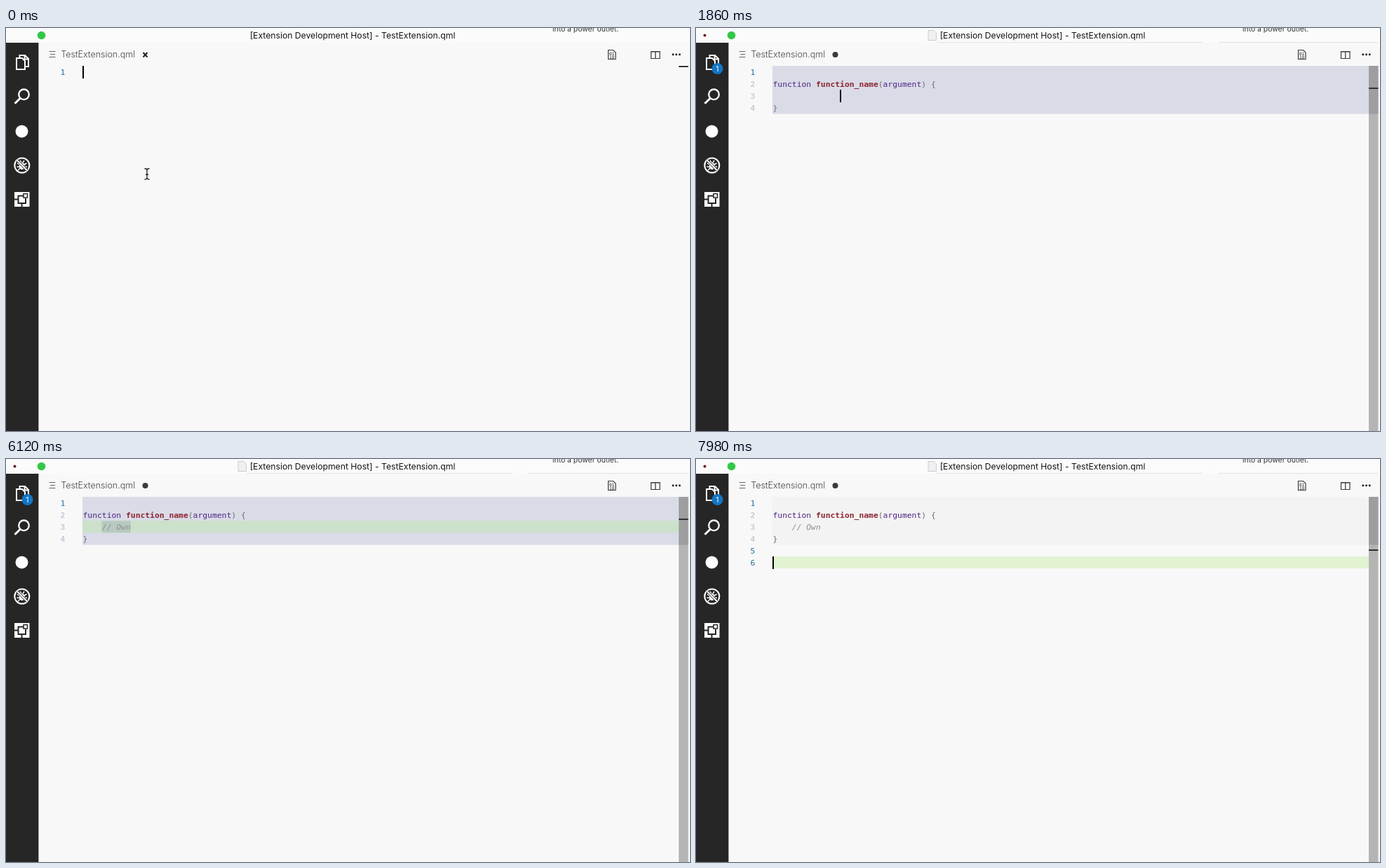
These frames come from a looping animation (975x575 px, 8000 ms). An HTML page:

```html
<!DOCTYPE html>
<html lang="en">
<head>
<meta charset="utf-8">
<title>Snippet demo</title>
<style>
  html, body { margin: 0; width: 100%; height: 100%; overflow: hidden; background: #f8f8f8; }
  svg { display: block; width: 975px; height: 575px; }
  text { white-space: pre; }
  .ui { font-family: Inter, "Open Sans", sans-serif; }
  .code { font: 11.35px "DejaVu Sans Mono", "Noto Sans Mono", monospace; }
  .key { fill: #4f2385; }
  .name { fill: #8c2530; font-weight: bold; }
  .punct { fill: #6c6c70; }
  .note { fill: #8e8e92; font-style: italic; }
  .num { fill: #237399; text-anchor: middle; }
  .pale { fill: #c9c9d8; font-weight: bold; }
  .line { fill: none; stroke: #fff; stroke-width: 2; }
  .dark { fill: none; stroke: #3a3a3a; stroke-width: 1.2; }
  .brace { fill: #b9c0bd; stroke: #8a918c; }
</style>
</head>
<body>
<svg viewBox="0 0 975 575">
  <rect width="975" height="575" fill="#f8f8f8"/>
  <rect width="975" height="21" fill="#fbfbfb"/>

  <!-- title bar -->
  <g data-on="60">
    <circle cx="12.5" cy="10.5" r="2" fill="#6d1512"/>
    <path d="M343 20.5H722M745 20.5H972" stroke="#e3e3e3"/>
    <path d="M331 3.5h8l3.5 3.5v10.5h-11.5z" fill="#eef0f2" stroke="#c9ccd0"/>
  </g>
  <circle cx="50.5" cy="10.5" r="5.8" fill="#33c748"/>
  <text class="ui" x="494" y="15" font-size="12.2" text-anchor="middle" fill="#151515">[Extension Development Host] - TestExtension.qml</text>
  <text class="ui" x="779" y="5" font-size="10.4" fill="#333">into a power outlet.</text>

  <!-- activity bar -->
  <rect y="21" width="46.4" height="554" fill="#262626"/>
  <path class="line" d="M19.500 43v-4h7.500l5 5v11h-4.500M26.500 39v5.500h5.500"/>
  <path class="line" d="M15 43h8l4 4v12h-12z" fill="#262626"/>
  <circle cx="25.5" cy="94.800" r="7.300" fill="none" stroke="#fff" stroke-width="2.300"/>
  <path d="M20.200 100.200L12.500 107.800" stroke="#fff" stroke-width="3"/>
  <circle cx="22.5" cy="147.5" r="9" fill="#fff"/>
  <g>
    <circle class="line" cx="22.800" cy="196" r="10.500"/>
    <ellipse cx="22.800" cy="197" rx="4" ry="5" fill="#fff"/>
    <path d="M16 193l4 2M15.500 198h4M17 203l3-3M29.500 193l-4 2M30 198h-4M28.500 203l-3-3M20 189l2 3M26 189l-2 3" stroke="#fff" stroke-width="1.400"/>
    <path d="M15.500 188.500L30.500 203.500" stroke="#262626" stroke-width="3.500"/>
    <path d="M15.500 188.500L30.500 203.500" stroke="#fff" stroke-width="2"/>
  </g>
  <rect x="12" y="234" width="21.500" height="21" fill="#fff"/>
  <path d="M25 239.500h-7.500v10.500h10.500v-7M12 244.500h5M22.500 250v5" fill="none" stroke="#262626" stroke-width="2"/>
  <path d="M25 236.500h5.500v5.500h-5.500z" fill="#fff" stroke="#262626" stroke-width="1.500"/>

  <g data-on="240">
    <circle cx="30.500" cy="58" r="8" fill="#1275c4"/>
    <text class="ui" x="30.500" y="62" font-size="10.500" text-anchor="middle" fill="#fff">1</text>
  </g>

  <!-- tab bar -->
  <path d="M61.500 33.500h9M63 37.500h7M61.500 41.500h9" stroke="#666" stroke-width="1.200"/>
  <text class="ui" x="78.200" y="42" font-size="12.500" font-weight="300" fill="#444">TestExtension.qml</text>
  <path data-on="0,60" d="M195.500 35l6 6.500M201.500 35l-6 6.500" stroke="#222" stroke-width="2"/>
  <circle data-on="60" cx="198.500" cy="38" r="4" fill="#3a3a3a"/>
  <path class="dark" d="M858.500 31.500h7l3.500 3.500v9.500h-10.500z"/>
  <g class="code" font-weight="bold" fill="#222">
    <text x="860" y="38.500" style="font-size:6px">01</text>
    <text x="860" y="44" style="font-size:6px">10</text>
  </g>
  <path class="dark" d="M919.500 33.500h12.500v10h-12.500zM925.700 33v10.500M919 34h13.500"/>
  <g fill="#222">
    <circle cx="950.800" cy="37.800" r="1.500"/><circle cx="955.500" cy="37.800" r="1.500"/><circle cx="960.200" cy="37.800" r="1.500"/>
  </g>

  <!-- editor backgrounds -->
  <rect data-on="960,7320" x="109" y="54" width="850" height="68.500" fill="#d9dbe7"/>
  <rect data-on="7320" x="109" y="54" width="850" height="68.500" fill="#f3f3f3"/>
  <rect id="row" x="109" width="850" height="17.100"/>
  <rect id="mark" x="136.500" y="88.200" height="17"/>
  <g data-on="6480,7320">
    <rect class="brace" x="335.500" y="71.500" width="7" height="16.500"/>
    <rect class="brace" x="109.500" y="105.500" width="6.500" height="16.500"/>
  </g>

  <!-- scroll strip -->
  <g data-on="960">
    <rect x="959" y="54" width="13.500" height="521" fill="#b4b4b4"/>
    <rect x="959" y="54" width="13.500" height="68.500" fill="#9e9ea0"/>
  </g>
  <rect id="ruler" x="959" width="13.500" height="2" fill="#333"/>

  <!-- code -->
  <g class="code">
    <text class="num" x="81" y="66.500">1</text>
    <g data-on="960">
      <text class="num pale" x="81" y="83.600">2</text>
      <text class="num pale" x="81" y="100.700">3</text>
      <text class="num pale" x="81" y="117.800">4</text>
      <text class="punct" x="109.500" y="83.600"><tspan class="key">function </tspan><tspan class="name">function_name</tspan>(<tspan class="key">argument</tspan>) {</text>
      <text class="punct" x="109.500" y="117.800">}</text>
    </g>
    <text class="num" data-on="7320" x="81" y="134.900">5</text>
    <text class="num" data-on="7920" x="81" y="152">6</text>
    <text id="word" class="key" x="109.500" y="66.500"></text>
    <text id="note" class="note" x="136.800" y="100.700"></text>
  </g>

  <!-- suggestion -->
  <g id="popup" data-on="120,960">
    <rect x=".5" y="71.500" width="417" height="35" fill="#d9e9fb" stroke="#a6b4c6"/>
    <rect x="5.500" y="76.500" width="8.500" height="8.500" fill="#f3f7fc" stroke="#333" stroke-dasharray="2 1"/>
    <path d="M5 85.500h9.500" stroke="#333"/>
    <text class="code" x="20.300" y="84.500" fill="#222"><tspan id="match" fill="#0757a0" font-weight="bold"></tspan><tspan id="rest"></tspan></text>
    <text class="code" x="298" y="84.500" fill="#505458">vsc-qml-snippets</text>
    <text class="ui" x="20" y="102" font-size="11.400" fill="#222">function() {}</text>
    <circle cx="399" cy="98" r="5" fill="#62b6de"/>
    <path d="M399 97v4M399 94.500v1.500" stroke="#fff" stroke-width="1.400"/>
  </g>

  <rect id="caret" width="2" height="18" fill="#000"/>
  <path data-on="0,60" d="M197.500 200.500q3.500 0 3.500 2.500q0-2.500 3.500-2.500M201 203v10.500M197.500 216q3.500 0 3.500-2.500q0 2.500 3.500 2.500M199 209h4" fill="none" stroke="#222" stroke-width="1.300"/>
</svg>
<script>
  const LOOP = 8000, CHAR = 6.833, LEFT = 109.3;
  const $ = id => document.getElementById(id);
  const lineTop = n => Math.floor(54 + 17.1 * (n - 1));
  const colLeft = n => Math.round(LEFT + CHAR * n);

  // Each step: start time, then values that hold until the next step.
  const caretSteps = [
    [0, 0, 1], [60, 1, 1], [180, 2, 1], [300, 3, 1], [780],
    [960, 14, 3], [1440], [1860, 14, 3], [2280, 4, 3],
    [2760, 5, 3], [3060, 6, 3], [3600], [3780, 7, 3], [4200],
    [4440, 8, 3], [4680, 9, 3], [4800, 10, 3], [5220], [5700, 10, 3], [6120],
    [6480, 1, 4], [6960], [7320, 0, 5], [7920, 0, 6]
  ];
  const rowSteps = [
    [0], [2280, 3, '#cbe1ca'], [6480, 4, '#cbe1ca'],
    [7320, 5, '#e1f3d1'], [7920, 6, '#e1f3d1']
  ];
  const rulerSteps = [[0, 54], [960, 85], [6480, 101], [7320, 115], [7920, 129]];
  const wordKeys = [60, 180, 300];
  const noteKeys = [2760, 3060, 3780, 4440, 4680, 4800];

  const at = (steps, t) => steps.filter(s => s[0] <= t).pop();
  const typed = (text, keys, t) => text.slice(0, keys.filter(k => k <= t).length);
  const show = (el, on) => { el.style.display = on ? '' : 'none'; };

  const timed = [...document.querySelectorAll('[data-on]')].map(el => {
    const [from, to = LOOP] = el.dataset.on.split(',').map(Number);
    return { el, from, to };
  });

  function draw(t) {
    for (const { el, from, to } of timed) show(el, t >= from && t < to);

    const [, col, line] = at(caretSteps, t);
    show($('caret'), line);
    if (line) {
      $('caret').setAttribute('x', colLeft(col));
      $('caret').setAttribute('y', lineTop(line));
    }

    const [, row, color] = at(rowSteps, t);
    show($('row'), row);
    if (row) {
      $('row').setAttribute('y', lineTop(row));
      $('row').setAttribute('fill', color);
    }
    $('ruler').setAttribute('y', at(rulerSteps, t)[1]);

    const word = typed('fun', wordKeys, t);
    $('word').textContent = t < 960 ? word : '';
    $('match').textContent = word;
    $('rest').textContent = 'function'.slice(word.length);
    $('popup').setAttribute('transform', `translate(${colLeft(word.length)})`);

    const note = typed('// Own', noteKeys, t);
    $('note').textContent = note;
    show($('mark'), note.length > 1 && t < 7320);
    $('mark').setAttribute('width', CHAR * note.length);
    $('mark').setAttribute('fill', t < 6480 ? '#b8cabf' : '#c3c8d7');
  }

  const start = performance.now();
  function tick() {
    draw((performance.now() - start) % LOOP);
    requestAnimationFrame(tick);
  }
  tick();
</script>
</body>
</html>
```
